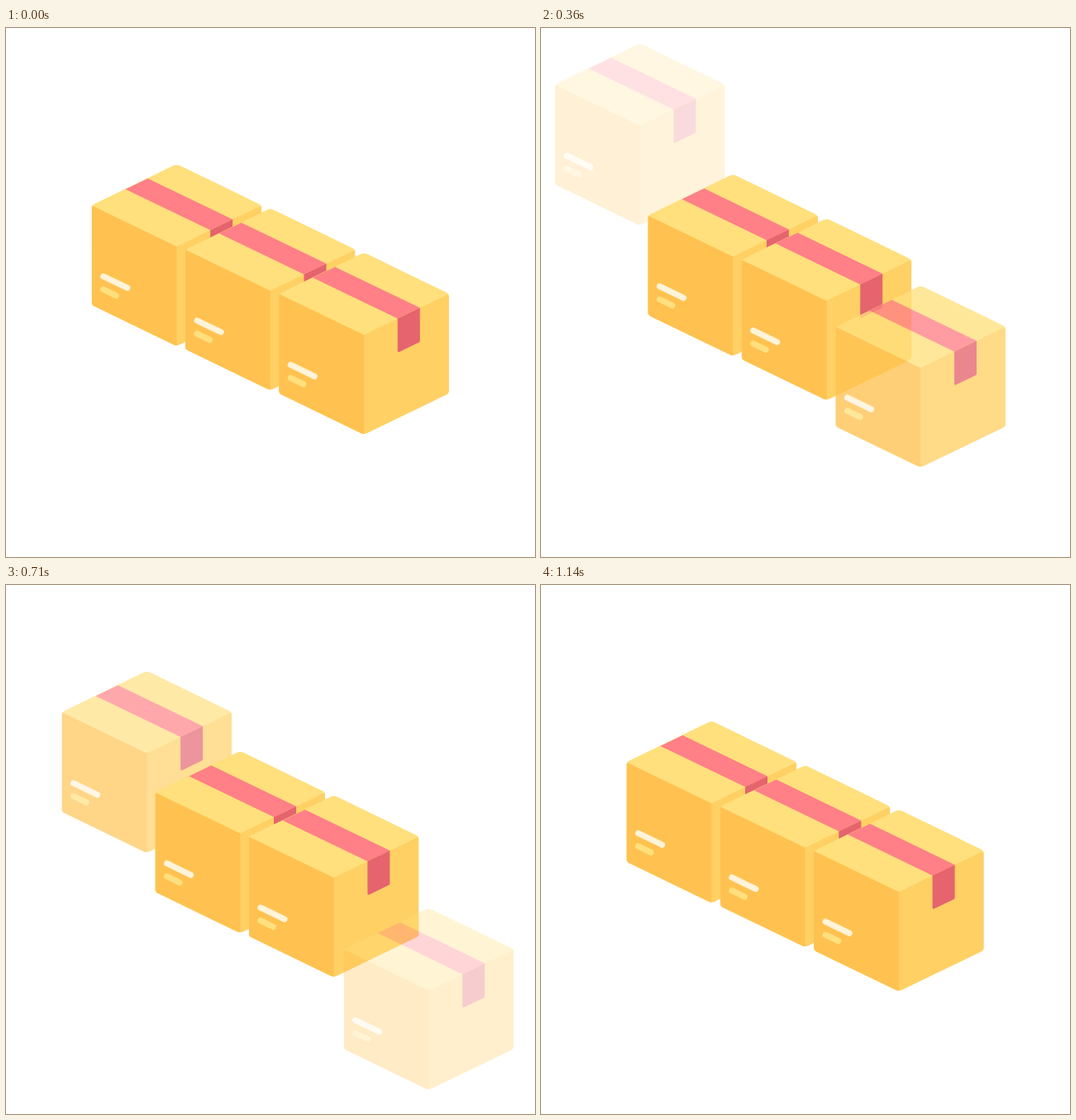
Animation of 640x640 px, one loop 1210 ms. Source, as an HTML page:

```html
<!DOCTYPE html>
<html lang="en">
<head>
<meta charset="utf-8">
<title>Moving boxes</title>
<style>
  html, body { margin: 0; width: 100%; height: 100%; overflow: hidden; background: #fff; }
  svg { display: block; width: 100vw; height: 100vh; }
</style>
</head>
<body>
<svg viewBox="0 0 640 640">
  <defs>
    <!-- Box with its origin at the front corner of the lid -->
    <clipPath id="outline">
      <path d="M-4 -97.5Q0 -99.4 4 -97.5L98.8 -51.5Q102.8 -49.6 102.8 -46.6V67.9Q102.8 70.9 98.8 72.8L4 118.7Q0 120.6 -4 118.7L-98.8 72.8Q-102.8 70.9 -102.8 67.9V-46.6Q-102.8 -49.6 -98.8 -51.5Z"/>
    </clipPath>
    <g id="box">
      <g clip-path="url(#outline)">
        <path fill="#ffd064" d="M-110 -110H110V130H-110Z"/>
        <path fill="#ffc250" d="M-110 -53.1L0 0V130H-110Z"/>
        <path fill="#ffe07d" d="M0 0L-110 -53.1V-110H110V-53.1Z"/>
        <path fill="#ff8086" d="M40.7 -19.7L-62.1 -69.3L-35.1 -82.3L67.7 -32.7Z"/>
        <path fill="#e5646e" d="M40.7 -19.7L67.7 -32.7V7.2Q67.7 8.4 66.6 9L43 20.4Q40.7 21.4 40.7 19Z"/>
      </g>
      <g fill="none" stroke-width="7.2" stroke-linecap="round">
        <path stroke="#fff3d9" d="M-88.7 36.2L-59.8 50.1"/>
        <path stroke="#ffe07d" d="M-88.7 52L-73.4 59.4"/>
      </g>
    </g>
  </defs>
  <use href="#box"/>
  <use href="#box"/>
  <use href="#box"/>
  <use href="#box"/>
</svg>
<script>
  const LOOP = 1210, STEPS = 17, POSES = 30;

  // Start and end point of each box, back to front
  const paths = [
    { from: [94.2, 75.2], to: [206.4, 264.2], alpha: p => p },
    { from: [206.4, 264.2], to: [319.7, 317.7], alpha: () => 1 },
    { from: [319.7, 317.7], to: [433, 371.2], alpha: () => 1 },
    { from: [433, 371.2], to: [548.5, 546.7], alpha: p => 1 - p }
  ];
  const boxes = document.querySelectorAll('use');

  // Steps last 70 ms, except two of 80 ms
  const stepStart = n => 70 * n + (n > 3 ? 10 : 0) + (n > 10 ? 10 : 0);

  function progress(time) {
    let n = STEPS - 1;
    while (stepStart(n) > time) n--;
    const pose = Math.ceil(n * POSES / STEPS);
    return (1 - Math.cos(Math.PI * (pose + 0.5) / POSES)) / 2;
  }

  function draw() {
    const p = progress(performance.now() % LOOP);
    paths.forEach(({ from, to, alpha }, i) => {
      const [x, y] = from.map((a, k) => a + (to[k] - a) * p);
      boxes[i].setAttribute('transform', `translate(${x} ${y})`);
      boxes[i].setAttribute('opacity', alpha(p));
    });
    requestAnimationFrame(draw);
  }
  draw();
</script>
</body>
</html>
```
